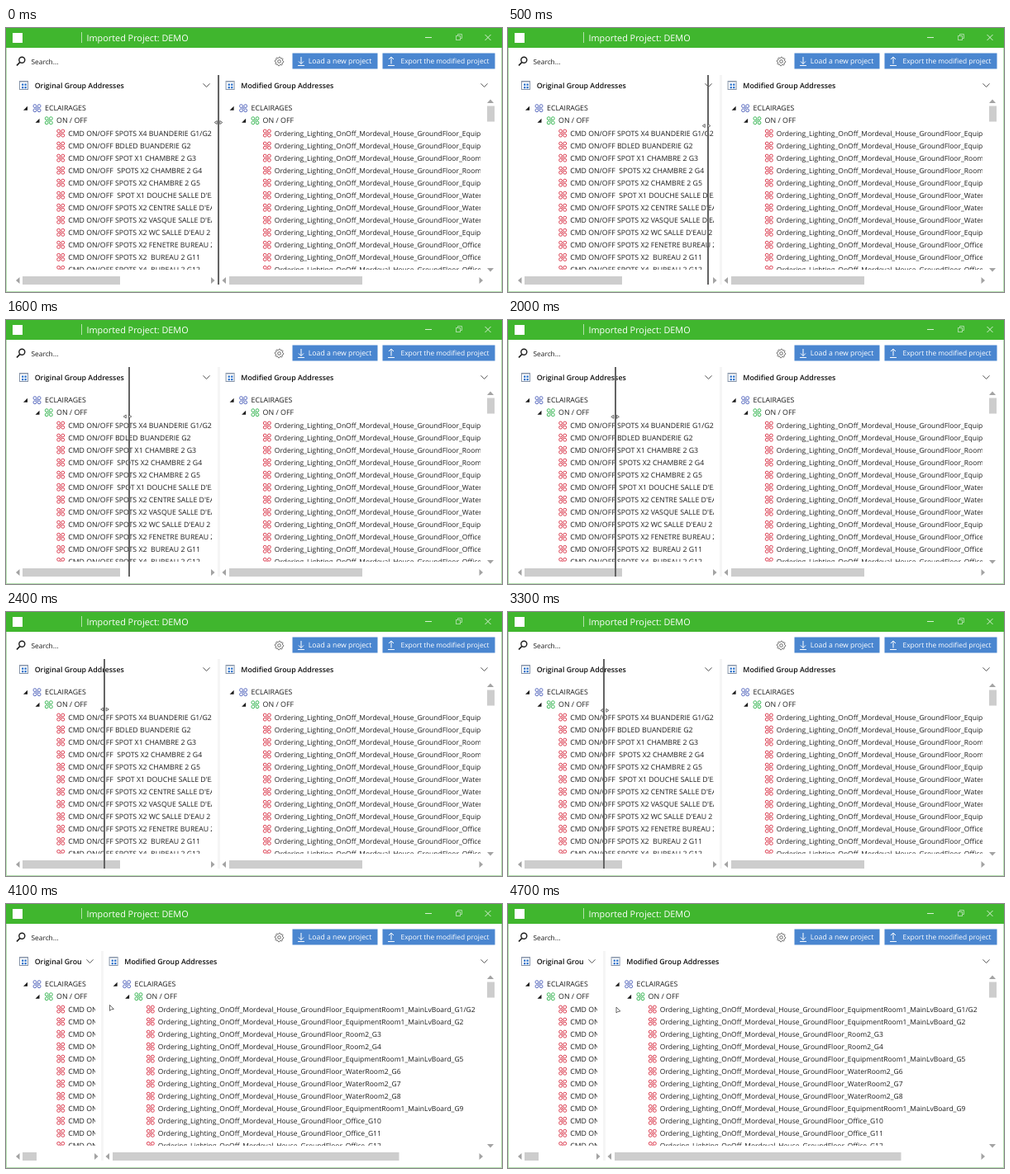
Write an HTML page with a canvas that moves like this. It is 600 by 320 pixels and loops after 5400 ms.

```html
<!DOCTYPE html>
<html lang="en">
<head>
<meta charset="utf-8">
<title>Group address importer</title>
<style>
  html, body { margin: 0; width: 100%; height: 100%; overflow: hidden; background: #fff; }
  canvas { display: block; width: 600px; height: 320px; }
</style>
</head>
<body>
<canvas id="stage" width="600" height="320"></canvas>
<script>
const ctx = document.getElementById('stage').getContext('2d');
const LOOP = 5400, STEP = 100, DROP = 3400;
const WIDE = 258, NARROW = 117;
const GREEN = '#40b62e', EDGE = '#b5dfb0', BLUE = '#4a86d0', INK = '#1c1c1c', THUMB = '#cdcdcd';
const FONT = '"Open Sans", "Noto Sans", sans-serif';

const leftItems = [
  'SPOTS X4 BUANDERIE G1/G2', 'BDLED BUANDERIE G2', 'SPOT X1 CHAMBRE 2 G3',
  ' SPOTS X2 CHAMBRE 2 G4', 'SPOTS X2 CHAMBRE 2 G5', " SPOT X1 DOUCHE SALLE D'EAU 2 G6",
  "SPOTS X2 CENTRE SALLE D'EAU 2 G7", "SPOTS X2 VASQUE SALLE D'EAU 2 G8",
  "SPOTS X2 WC SALLE D'EAU 2 G9", 'SPOTS X2 FENETRE BUREAU 2 G10',
  'SPOTS X2  BUREAU 2 G11', 'SPOTS X4  BUREAU 2 G12'
].map(s => 'CMD ON/OFF ' + s);

const board = 'EquipmentRoom1_MainLvBoard';
const rightItems = [board, board, 'Room2', 'Room2', board, 'WaterRoom2', 'WaterRoom2',
  'WaterRoom2', board, 'Office', 'Office', 'Office'
].map((room, i) => 'Ordering_Lighting_OnOff_Mordeval_House_GroundFloor_' + room + '_G' + (i ? i + 1 : '1/G2'));

// Motion keys: [time, value]
const lineX = [[0, 257.4], [900, 218], [1600, 149], [1800, 138], [2400, 119], [2900, 116], [3400, 116]];
const mouseX = [[0, 257], [900, 214.5], [1600, 147], [1800, 137], [2400, 119.5], [2900, 117],
  [3600, 117], [4200, 127], [4700, 131]];
const mouseY = [[0, 114.5], [900, 121.5], [1600, 117], [2400, 118], [2900, 119.3], [3600, 119.3],
  [4200, 123], [4700, 125]];

// Monotone cubic interpolation through the keys
function valueAt(keys, t) {
  const last = keys.length - 1;
  if (t >= keys[last][0]) return keys[last][1];
  const slope = i => (keys[i + 1][1] - keys[i][1]) / (keys[i + 1][0] - keys[i][0]);
  const tangent = i => {
    if (i === 0 || i === last) return 0;
    const a = slope(i - 1), b = slope(i);
    return a * b > 0 ? 2 * a * b / (a + b) : 0;
  };
  let i = 0;
  while (t >= keys[i + 1][0]) i++;
  const [t0, v0] = keys[i], [t1, v1] = keys[i + 1];
  const d = t1 - t0, u = (t - t0) / d, w = 1 - u;
  return v0 * (1 + 2 * u) * w * w + tangent(i) * d * u * w * w
    + v1 * u * u * (3 - 2 * u) - tangent(i + 1) * d * u * u * w;
}

function rect(x, y, w, h, color) {
  ctx.fillStyle = color;
  ctx.fillRect(x, y, w, h);
}

function text(s, x, y, size, color = INK, weight = 400) {
  ctx.font = `${weight} ${size}px ${FONT}`;
  ctx.fillStyle = color;
  ctx.fillText(s, x, y);
}

function trace(points) {
  ctx.beginPath();
  points.forEach(([x, y]) => ctx.lineTo(x, y));
}

function line(points, color, width = 1) {
  trace(points);
  ctx.strokeStyle = color;
  ctx.lineWidth = width;
  ctx.stroke();
}

function shape(points, color) {
  trace(points);
  ctx.closePath();
  ctx.fillStyle = color;
  ctx.fill();
}

function circle(x, y, r, color, width) {
  ctx.beginPath();
  ctx.arc(x, y, r, 0, Math.PI * 2);
  ctx.strokeStyle = color;
  ctx.lineWidth = width;
  ctx.stroke();
}

function clipped(x, y, w, h, draw) {
  ctx.save();
  ctx.beginPath();
  ctx.rect(x, y, w, h);
  ctx.clip();
  draw();
  ctx.restore();
}

function titleBar() {
  rect(0, 0, 600, 24, GREEN);
  rect(8, 6, 12, 12, '#fff');
  rect(91, 5, 1, 13, '#b4e2ad');
  text('Imported Project: DEMO', 97.5, 16, 10.85, '#fff');
  const pale = '#d6f0d2', dim = '#a5dba0';
  line([[507, 11.5], [515, 11.5]], pale);
  ctx.strokeStyle = dim;
  ctx.strokeRect(544.5, 9.5, 5, 5);
  line([[546.5, 9], [546.5, 7.5], [551.5, 7.5], [551.5, 12.5], [550, 12.5]], dim);
  line([[579.5, 8], [586.5, 15]], pale);
  line([[586.5, 8], [579.5, 15]], pale);
}

function gear(x, y) {
  const pts = [];
  for (let i = 0; i <= 32; i++) {
    const a = i * Math.PI / 16, r = i % 4 < 2 ? 5.3 : 4.2;
    pts.push([x + r * Math.cos(a), y + r * Math.sin(a)]);
  }
  line(pts, '#555', 0.9);
  circle(x, y, 1.8, '#555', 0.9);
}

function button(x, w, label, size, up) {
  rect(x - 0.5, 30.5, w + 1, 19, BLUE);
  const cx = x + 10, tip = up ? 35 : 43.5, tail = up ? 43.5 : 35, back = up ? 3 : -3;
  line([[cx, tail], [cx, tip]], '#fff');
  line([[cx - 3, tip + back], [cx, tip], [cx + 3, tip + back]], '#fff');
  line([[cx - 4, 45.5], [cx + 4, 45.5]], '#fff');
  text(label, x + (up ? 21.5 : 18.8), 43, size, '#fff');
}

function toolBar() {
  circle(19.3, 38.8, 3.5, INK, 1.4);
  line([[16.8, 41.5], [13, 45.5]], INK, 1.8);
  text('Search...', 30.5, 43.6, 8.35);
  gear(330.5, 40.5);
  button(347, 102, 'Load a new project', 8.7, false);
  button(456, 135, 'Export the modified project', 8.38, true);
}

function panelHead(x, title, titleEnd, chevron) {
  ctx.strokeStyle = '#8794a8';
  ctx.lineWidth = 1;
  ctx.strokeRect(x + 16.5, 64.5, 10, 10);
  rect(x + 17, 65, 9, 1, '#c3cbd6');
  for (const dx of [19, 22.5])
    for (const y of [67.5, 71]) rect(x + dx, y, 2.3, 2.3, '#2f74cc');
  clipped(x, 56, titleEnd - x, 28, () => text(title, x + 34.7, 73, 8.8, '#111', 600));
  line([[chevron - 4, 67.3], [chevron, 71.5], [chevron + 4, 67.3]], '#444', 0.9);
}

function nodeIcon(x, y, color) {
  for (const dx of [-2.6, 2.6])
    for (const dy of [-2.6, 2.6]) circle(x + dx, y + dy, 1.9, color, 1);
  circle(x, y, 0.8, color, 0.8);
}

function expander(x, y) {
  shape([[x + 5, y - 2.5], [x + 5, y + 2.5], [x, y + 2.5]], INK);
}

function tree(x, end, items, size) {
  const rowY = i => 97.2 + 15.03 * i;
  clipped(x, 84, end - x, 209, () => {
    expander(x + 21, rowY(0));
    nodeIcon(x + 37.5, rowY(0), '#5a6cc0');
    text('ECLAIRAGES', x + 47, rowY(0) + 3.2, 8.77);
    expander(x + 35.5, rowY(1));
    nodeIcon(x + 51.8, rowY(1), '#3fb95a');
    text('ON / OFF', x + 61, rowY(1) + 3.2, 8.85);
    items.forEach((s, i) => {
      const y = rowY(i + 2);
      nodeIcon(x + 66.2, y + 0.3, '#dc3f52');
      text(s, x + 75.2, y + 3.3, size);
    });
  });
}

function pointer(x, y, dx, dy) {
  const px = -dy * 4, py = dx * 4;
  shape([[x + dx * 2.5, y + dy * 2.5], [x - dx * 2 + px, y - dy * 2 + py],
    [x - dx * 2 - px, y - dy * 2 - py]], '#a3a3a3');
}

function scrollX(from, to, thumbFrom, thumbTo) {
  pointer(from, 306, -1, 0);
  pointer(to, 306, 1, 0);
  rect(thumbFrom, 301, thumbTo - thumbFrom, 10, THUMB);
}

function panels(split) {
  const wide = split === WIDE, rx = split - 8.4;
  rect(split - 2, 57, 3, 254, '#f5f5f5');
  panelHead(0, 'Original Group Addresses', split - 26, split - 15.5);
  panelHead(rx, 'Modified Group Addresses', 565, 578.5);
  tree(0, split - 9, leftItems, 8.74);
  tree(rx, 574, rightItems, 8.5);
  scrollX(14.5, split - 8, 20, wide ? 138 : 37);
  scrollX(split + 6, 574.5, split + 12, wide ? 431 : 475.5);
  pointer(586, 89, 0, -1);
  pointer(586, 293, 0, 1);
  rect(582, 94.5, 9, 19, THUMB);
}

function outlined(points) {
  shape(points, '#fff');
  line([...points, points[0]], '#444', 0.8);
}

function mouse(x, y, dragging) {
  if (dragging) {
    for (const s of [-1, 1])
      outlined([[x + s * 4.8, y], [x + s * 1.8, y - 2], [x + s * 1.8, y + 2]]);
  } else {
    outlined([[x, y], [x, y + 7], [x + 1.8, y + 5.5], [x + 4.8, y + 5]]);
  }
}

function draw(t) {
  const dropped = t >= DROP;
  rect(0, 0, 600, 320, '#fff');
  titleBar();
  toolBar();
  panels(dropped ? NARROW : WIDE);
  if (!dropped) rect(Math.round(valueAt(lineX, t)) - 1, 57, 2, 254, '#646464');
  const x = valueAt(mouseX, t);
  mouse(x, valueAt(mouseY, t), !dropped || x < 121);
  rect(0, 24, 1, 296, EDGE);
  rect(599, 24, 1, 296, EDGE);
  rect(0, 319, 600, 1, EDGE);
}

ctx.textRendering = 'geometricPrecision';
function tick() {
  const t = performance.now() % LOOP;
  draw(Math.floor(t / STEP) * STEP);
  requestAnimationFrame(tick);
}
tick();
</script>
</body>
</html>
```
